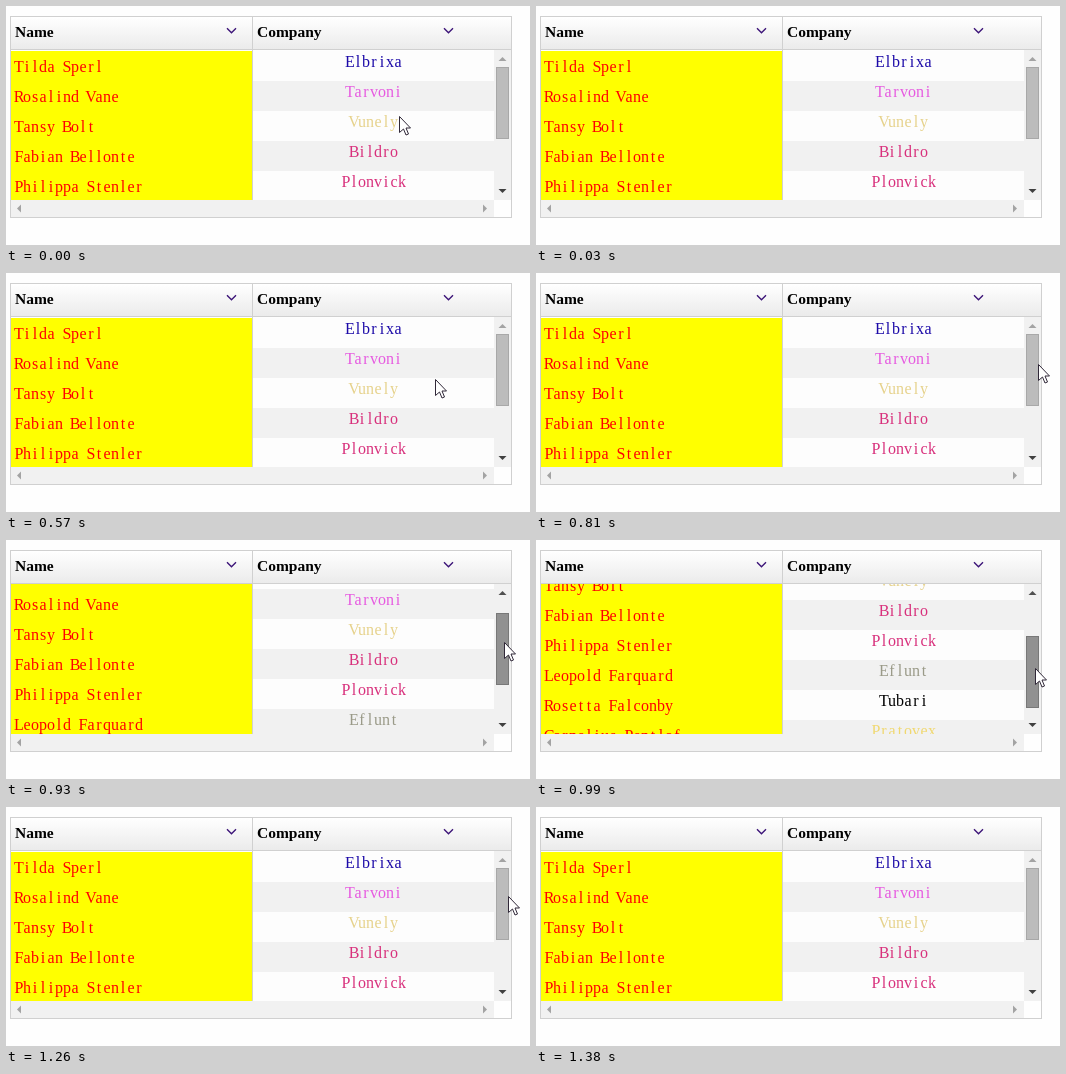
An HTML page with a canvas for the animation above (1.62 s loop, 524x239 px).

```html
<!DOCTYPE html>
<html lang="en">
<head>
<meta charset="utf-8">
<title>Scrolling table</title>
<style>
html, body { margin: 0; width: 100%; height: 100%; overflow: hidden; background: #fefefe; }
canvas { display: block; }
</style>
</head>
<body>
<canvas id="stage" width="524" height="239"></canvas>
<script>
const ctx = document.getElementById('stage').getContext('2d');
const LOOP = 1620, TICK = 30, ROW = 30, CELL = 8, MAX_SCROLL = 90, MAX_THUMB = 43;
const FAMILY = '"Liberation Serif", serif';
const LINE = '#d0d0d0';

const rows = [
  ['Tilda Sperl', 'Elbrixa', '#1c0aa8'],
  ['Rosalind Vane', 'Tarvoni', '#e65ae0'],
  ['Tansy Bolt', 'Vunely', '#e6d28c'],
  ['Fabian Bellonte', 'Bildro', '#d8307c'],
  ['Philippa Stenler', 'Plonvick', '#d8307c'],
  ['Leopold Farquard', 'Eflunt', '#9a9a88'],
  ['Rosetta Falconby', 'Tubari', '#000'],
  ['Cornelius Pentlof', 'Pratovex', '#f0d870']
];

const progress = (t, from, to) => Math.min(1, Math.max(0, (t - from) / (to - from)));
const swing = (t, from, to) => Math.sin(Math.PI * progress(t, from, to));

// A wheel turn down and back, then a drag of the thumb
function scrollAt(t) {
  if (t < 450) return t < 390 ? 0 : MAX_SCROLL;
  return Math.round(MAX_SCROLL * swing(t, 905, 1176));
}

// Glide to the scrollbar, step back onto the thumb, drag it down and up
function cursorAt(t) {
  const glide = progress(t, 450, 840);
  return [
    393 + 118 * glide - 13 * progress(t, 840, 930) + 4 * progress(t, 930, 1140),
    110 - 21 * glide ** 1.4 + MAX_THUMB * swing(t, 907, 1140)
  ];
}

function rect(x, y, w, h, fill) {
  ctx.fillStyle = fill;
  ctx.fillRect(x, y, w, h);
}

// Every character sits in the middle of a cell of equal width
function cells(str, x, y, color) {
  ctx.font = `16px ${FAMILY}`;
  ctx.textAlign = 'center';
  ctx.fillStyle = color;
  [...str].forEach((char, i) => ctx.fillText(char, x + (i + .5) * CELL, y));
}

function title(str, x) {
  ctx.font = `bold 15.5px ${FAMILY}`;
  ctx.textAlign = 'left';
  ctx.fillStyle = '#000';
  ctx.fillText(str, x, 31);
}

function path(points, x, y) {
  ctx.beginPath();
  points.forEach(([px, py]) => ctx.lineTo(x + px, y + py));
}

// dx, dy: the direction in which the arrow points
function arrowPath(x, y, dx, dy, half, depth) {
  path([[-1, -1], [0, 1], [1, -1]].map(([across, along]) =>
    [dy * across * half + dx * along * depth, dx * across * half + dy * along * depth]), x, y);
}

function arrow(x, y, dx, dy, color) {
  arrowPath(x, y, dx, dy, 4, 2);
  ctx.fillStyle = color;
  ctx.fill();
}

function chevron(x) {
  arrowPath(x, 24.5, 0, 1, 4.5, 2.25);
  ctx.strokeStyle = '#3c1478';
  ctx.lineWidth = 1.4;
  ctx.stroke();
}

function header() {
  const shade = ctx.createLinearGradient(0, 11, 0, 43);
  shade.addColorStop(0, '#fff');
  shade.addColorStop(1, '#ebebeb');
  rect(5, 11, 500, 32, shade);
  rect(5, 43, 500, 1, LINE);
  title('Name', 9);
  title('Company', 251);
  chevron(225.5);
  chevron(442.5);
}

function body(scroll) {
  ctx.save();
  ctx.beginPath();
  ctx.rect(5, 44, 483, 150);
  ctx.clip();
  rows.forEach(([name, company, color], i) => {
    const y = 45 + i * ROW - scroll;
    rect(5, y, 241, ROW, '#ff0');
    rect(247, y, 241, ROW, i % 2 ? '#f1f1f1' : '#fdfdfd');
    cells(name, 9, y + 21, '#f00');
    cells(company, 368 - company.length * CELL / 2, y + 16, color);
  });
  ctx.restore();
}

function scrollbars(scroll, dragging) {
  rect(488, 44, 17, 150, '#f1f1f1');
  rect(5, 194, 483, 17, '#f1f1f1');
  const y = 61 + Math.floor(scroll * MAX_THUMB / MAX_SCROLL);
  rect(490, y, 13, 72, dragging ? '#787878' : '#a8a8a8');
  rect(491, y + 1, 11, 70, dragging ? '#919191' : '#bcbcbc');
  arrow(496.5, 53, 0, -1, scroll ? '#505050' : '#a3a3a3');
  arrow(496.5, 185, 0, 1, '#404040');
  arrow(13, 202.5, -1, 0, '#a3a3a3');
  arrow(479, 202.5, 1, 0, '#a3a3a3');
}

function cursor([x, y]) {
  path([[0, 0], [0, 16], [4, 12.5], [6.5, 18.5], [9, 17.5], [6.5, 11.5], [11, 11.5]],
    Math.round(x) + .5, Math.round(y) + .5);
  ctx.closePath();
  ctx.fillStyle = '#fff';
  ctx.fill();
  ctx.strokeStyle = '#302838';
  ctx.lineWidth = 1;
  ctx.stroke();
}

function draw(now) {
  const t = Math.floor(now % LOOP / TICK) * TICK;
  const scroll = scrollAt(t);
  rect(0, 0, 524, 239, '#fefefe');
  header();
  body(scroll);
  rect(246, 11, 1, 183, LINE);
  scrollbars(scroll, t >= 900 && t < 1200);
  ctx.strokeStyle = LINE;
  ctx.lineWidth = 1;
  ctx.strokeRect(4.5, 10.5, 501, 201);
  if (t < 30 || t >= 390 && t < 1380) cursor(cursorAt(t));
}

const start = performance.now();
function frame() {
  draw(performance.now() - start);
  requestAnimationFrame(frame);
}
frame();
</script>
</body>
</html>
```
